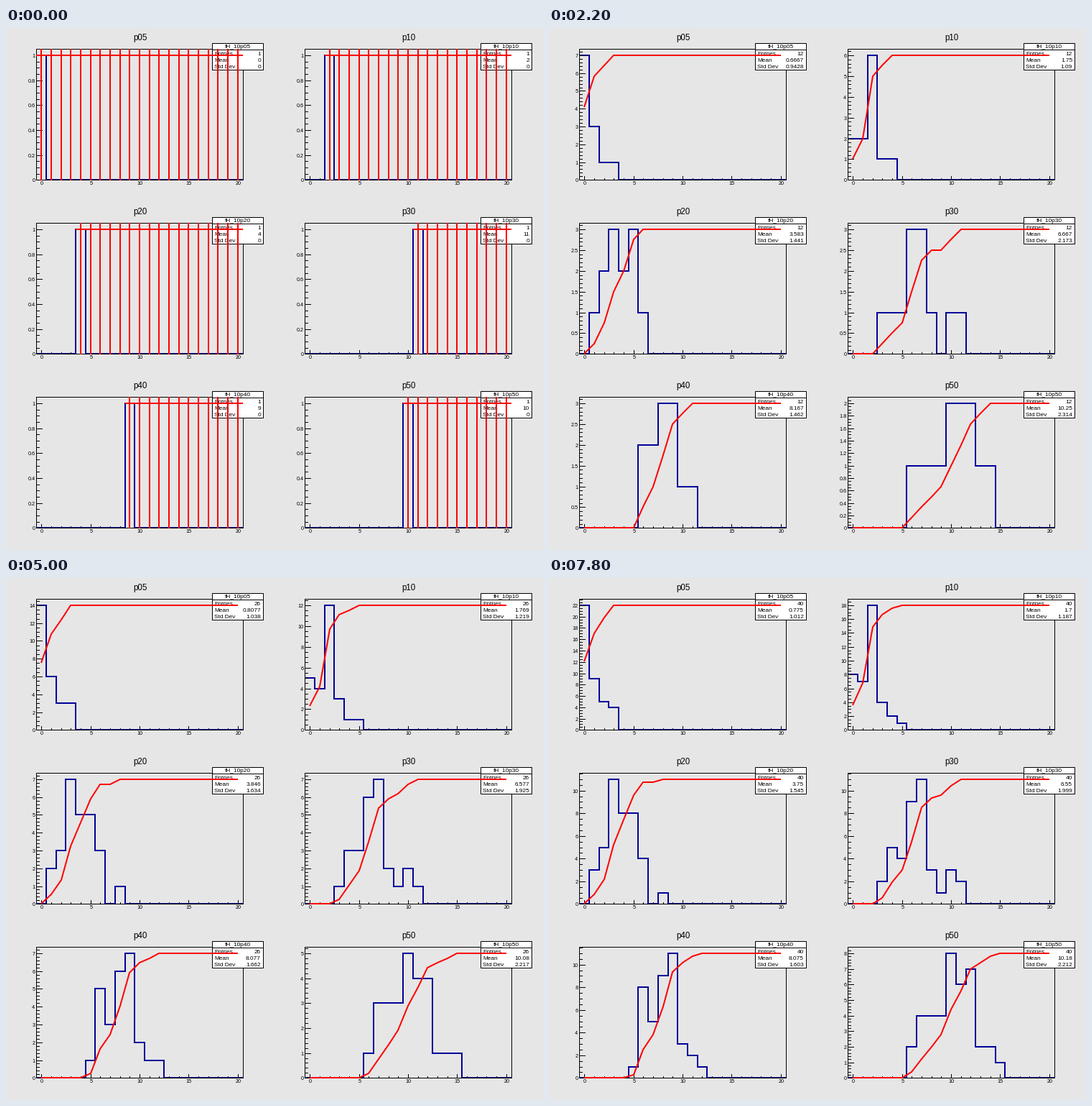
These frames come from a looping animation (748x726 px, 8000 ms). A matplotlib script:

```python
import math

import matplotlib.pyplot as plt
import numpy as np
from matplotlib.animation import FuncAnimation
from matplotlib.collections import LineCollection
from matplotlib.patches import Rectangle

W, H, DPI = 748, 726, 64
PT = 72 / DPI              # points per pixel
BINS = 21
PLOT_W, PLOT_H = 287.23, 182
STEPS, INTERVAL = 40, 200
BLUE, RED = "#000099", "#ff0000"

plt.rcParams["font.family"] = "Liberation Sans"
fig = plt.figure(figsize=(W / DPI, H / DPI), dpi=DPI, facecolor="#e6e6e6")
ax = fig.add_axes([0, 0, 1, 1])
ax.set_xlim(0, W)
ax.set_ylim(H, 0)
ax.axis("off")


def label(x, y, text, size, ha="center"):
    return ax.text(x, y, text, fontsize=size * PT, ha=ha, va="baseline", zorder=6)


def box(x, y, w, h, z, fill="none"):
    # centred on pixels, so a one pixel border stays sharp
    ax.add_patch(Rectangle((x + 0.5, y + 0.5), w, h, facecolor=fill,
                           edgecolor="black", lw=PT, zorder=z, snap=False))


def hairlines(segments=(), z=4):
    lines = LineCollection(segments, colors="black", linewidths=PT, zorder=z)
    lines.set_snap(False)
    ax.add_collection(lines)
    return lines


def curve(color, z):
    return ax.plot([], [], color=color, lw=2 * PT, zorder=z, snap=False,
                   solid_capstyle="butt", solid_joinstyle="miter")[0]


def nice(width):
    """Round a tick distance up to 1, 2, 5 or 10 times a power of ten."""
    unit = 10.0 ** math.floor(math.log10(width))
    return unit * next(k for k in (1, 2, 5, 10) if width <= k * unit + 1e-9)


def y_ticks(top):
    parts = 10
    step = nice(top / parts)
    while math.ceil(top / step) == 5:
        parts += 1
        step = nice(top / parts)
    return step, round(step / nice(step / 5))


def arrivals(first, lo, totals):
    """Order the entries so that every bin fills at an even rate."""
    order = sorted(((k + 0.5) / n, -(lo + i))
                   for i, n in enumerate(totals) for k in range(n))
    bins = [-b for _, b in order]
    bins.remove(first)
    return [first] + bins


class Panel:
    def __init__(self, slot, name, first, lo, totals):
        self.left = 42 + 374 * (slot % 2)
        self.top = 29 + 242 * (slot // 2)
        self.bottom = self.top + PLOT_H
        self.draws = arrivals(first, lo, totals)
        self.y_labels = []
        self.draw_fixed(name)
        self.hist = curve(BLUE, 3)
        self.ticks = hairlines()
        self.total = curve(RED, 8)

    def px(self, value):
        return np.round(self.left + 0.41 + (np.asarray(value) + 0.5) * PLOT_W / BINS)

    def py(self, value, top):
        return np.round(self.bottom + 0.3 - np.asarray(value) * PLOT_H / top)

    def draw_fixed(self, name):
        l, t, b = self.left, self.top, self.bottom
        label(l + 144.5, t - 11.5, name, 11.5)
        box(l, t, 288, PLOT_H, 4)
        ticks = []
        for v in range(BINS):
            x = self.px(v) + 0.5
            ticks.append([(x, b), (x, b - (5 if v % 5 == 0 else 2))])
            if v % 5 == 0:
                label(x, b + 7.5, str(v), 7.3)
        hairlines(ticks)

        box(l + 245, t - 8, 71, 37, 5, "white")
        hairlines([[(l + 245, t + 1.5), (l + 316, t + 1.5)]], 6)
        label(l + 281, t - 0.5, "fH_10" + name, 8.3)
        self.stats = []
        for row, text in enumerate(("Entries", "Mean", "Std Dev")):
            y = t + 9 + 9 * row
            label(l + 248, y, text, 8.2, "left")
            self.stats.append(label(l + 313, y, "", 8.2, "right"))

    def draw_y_axis(self, top):
        for old in self.y_labels:
            old.remove()
        self.y_labels = []
        step, subs = y_ticks(top)
        segments = []
        for k in range(int(top / step * subs + 1e-6) + 1):
            value = k * step / subs
            y = self.py(value, top) + 0.5
            major = k % subs == 0
            segments.append([(self.left, y), (self.left + (9 if major else 5), y)])
            if major:
                self.y_labels.append(
                    label(self.left - 1.5, y + 2.5, f"{value:.4g}", 7.3, "right"))
        self.ticks.set_segments(segments)

    def error_bars(self, first, y):
        xs, ys = [], []
        for x in self.px(np.arange(first, BINS)):
            xs += [x, x, np.nan]
            ys += [self.top, self.bottom + 1, np.nan]
        ends = self.px([first - 0.5, BINS - 0.5])
        return xs + list(ends), ys + [y, y]

    def update(self, n):
        data = np.array(self.draws[:n])
        counts = np.bincount(data, minlength=BINS)
        peak = counts.max()
        top = 1.05 * peak

        self.draw_y_axis(top)
        edges = self.px(np.arange(BINS + 1) - 0.5)
        self.hist.set_data(np.repeat(edges, 2)[1:-1],
                           self.py(np.repeat(counts, 2), top))

        # a lone entry shows error bars in place of a line
        if n == 1:
            self.total.set_data(*self.error_bars(data[0], self.py(1, top)))
        else:
            self.total.set_data(self.px(np.arange(BINS)),
                                self.py(np.cumsum(counts) / n * peak, top))

        for text, value in zip(self.stats, (n, data.mean(), data.std())):
            text.set_text(f"{value:.4g}")


# name, first entry, lowest bin and final height of each bar
panels = [
    Panel(0, "p05", 0, 0, [22, 9, 5, 4]),
    Panel(1, "p10", 2, 0, [8, 7, 18, 4, 2, 1]),
    Panel(2, "p20", 4, 1, [3, 5, 11, 8, 8, 4, 0, 1]),
    Panel(3, "p30", 11, 3, [2, 5, 4, 9, 11, 3, 1, 3, 2]),
    Panel(4, "p40", 9, 5, [1, 8, 5, 9, 11, 3, 2, 1]),
    Panel(5, "p50", 10, 6, [2, 4, 4, 4, 8, 6, 7, 2, 2, 1]),
]


def draw(i):
    for panel in panels:
        panel.update(i + 1)
    return []


anim = FuncAnimation(fig, draw, frames=STEPS, init_func=lambda: draw(0),
                     interval=INTERVAL, repeat=True, repeat_delay=0, blit=False)
plt.show()
```
